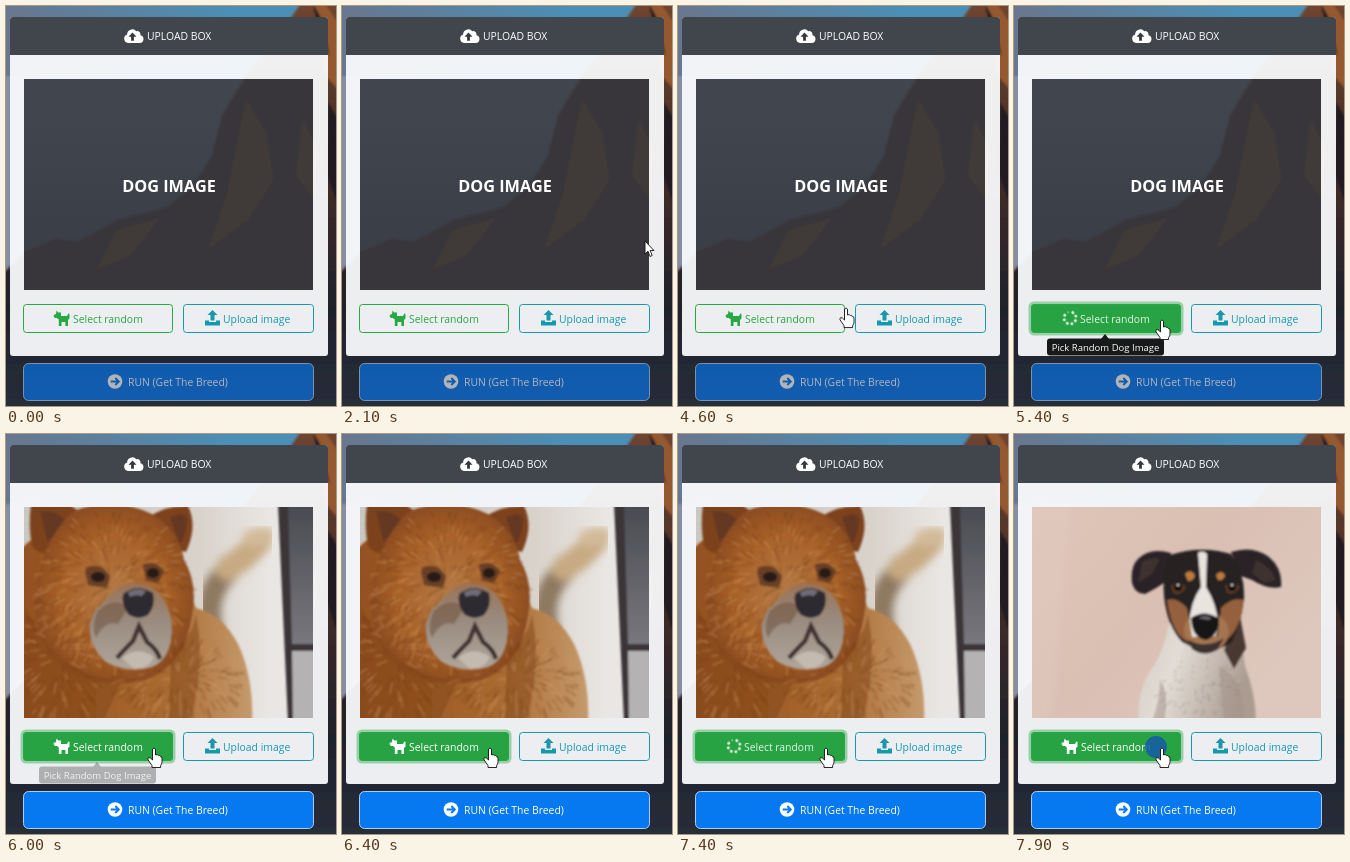
Write an HTML page that moves like this. It is 330x400 px and loops after 8 s.

```html
<!DOCTYPE html>
<html lang="en">
<head>
<meta charset="utf-8">
<title>Upload box</title>
<style>
html, body { margin: 0; width: 100%; height: 100%; overflow: hidden; background: #262b38; }
svg { display: block; width: 330px; height: 400px; }
text { font: 500 10.4px "Open Sans", "Noto Sans", sans-serif; }
.title { font-size: 16.3px; font-weight: 700; }
.tip text { font-size: 9.5px; }

.cursor, .arrow, .hand, .hover, .ring, .icon, .load, .tip, .run, .chow, .terrier, .ripple {
  animation: 8s step-end infinite;
}
.cursor { animation-name: move; animation-timing-function: linear; }
.hover { animation-name: hover; animation-timing-function: linear; }
.tip { animation-name: tip; animation-timing-function: linear; }
.arrow { animation-name: arrow; }
.hand { animation-name: hand; }
.ring { animation-name: ring; }
.load { animation-name: load; }
.icon { animation-name: icon; }
.run { animation-name: run; }
.chow { animation-name: chow; }
.terrier { animation-name: terrier; }
.ripple { animation-name: ripple; }
.spin { animation: spin 2s linear infinite; }

@keyframes move {
  0%, 5% { transform: translate(338px, 222px); }
  12.5%, 30% { transform: translate(303px, 235px); }
  41.25% { transform: translate(240px, 255px); }
  57.5% { transform: translate(168px, 302px); }
  62%, 100% { transform: translate(148px, 314px); }
}
@keyframes hover { 0%, 57.5% { opacity: 0; } 59.4%, 100% { opacity: 1; } }
@keyframes tip {
  0%, 62% { opacity: 0; }
  64%, 74% { opacity: .9; }
  75% { opacity: .27; }
  76%, 100% { opacity: 0; }
}
@keyframes arrow { 0% { opacity: 1; } 57% { opacity: 0; } }
@keyframes hand { 0% { opacity: 0; } 57% { opacity: 1; } }
@keyframes ring { 0% { opacity: 0; } 63.75% { opacity: 1; } }
@keyframes load { 0% { opacity: 0; } 65% { opacity: 1; } 71.25% { opacity: 0; } 87.5% { opacity: 1; } 93.75% { opacity: 0; } }
@keyframes icon { 0% { opacity: 1; } 65% { opacity: 0; } 71.25% { opacity: 1; } 87.5% { opacity: 0; } 93.75% { opacity: 1; } }
@keyframes run { 0% { opacity: .65; } 71.25% { opacity: 1; } }
@keyframes chow { 0% { opacity: 0; } 71.25% { opacity: 1; } 93.75% { opacity: 0; } }
@keyframes terrier { 0% { opacity: 0; } 93.75% { opacity: 1; } }
@keyframes ripple { 0% { opacity: 0; } 63.75% { opacity: .85; } 66.25% { opacity: 0; } 86.25% { opacity: .85; } 88.7% { opacity: 0; } 97.5% { opacity: .85; } }
@keyframes spin { to { transform: rotate(360deg); } }
</style>
</head>
<body>
<svg viewBox="0 0 330 400">
  <defs>
    <linearGradient id="sky"><stop offset="0" stop-color="#68778e"/><stop offset=".7" stop-color="#4b8fb7"/></linearGradient>
    <linearGradient id="rock" x2="0" y2="1">
      <stop offset="0" stop-color="#70452f"/><stop offset=".45" stop-color="#3f2b28"/>
      <stop offset=".75" stop-color="#1f222c"/><stop offset="1" stop-color="#282e3a"/>
    </linearGradient>
    <linearGradient id="slate" x2="0" y2="1"><stop offset="0" stop-color="#42474f"/><stop offset="1" stop-color="#393c44"/></linearGradient>
    <linearGradient id="wall"><stop offset="0" stop-color="#c9c8c3"/><stop offset=".6" stop-color="#d8d2ca"/><stop offset=".85" stop-color="#e9e6e3"/></linearGradient>
    <linearGradient id="door" x2="0" y2="1"><stop offset="0" stop-color="#494b51"/><stop offset="1" stop-color="#939095"/></linearGradient>
    <linearGradient id="coat"><stop offset="0" stop-color="#93501f"/><stop offset=".6" stop-color="#a8692f"/><stop offset="1" stop-color="#c59a6c"/></linearGradient>
    <radialGradient id="face"><stop offset="0" stop-color="#b47a47"/><stop offset=".65" stop-color="#a96229"/><stop offset="1" stop-color="#8d4d20"/></radialGradient>
    <linearGradient id="muzzle" x2="0" y2="1"><stop offset="0" stop-color="#997356"/><stop offset=".45" stop-color="#9a8c81"/><stop offset="1" stop-color="#b1a69b"/></linearGradient>
    <linearGradient id="pink" x2="1" y2=".6"><stop offset="0" stop-color="#dfc4b8"/><stop offset=".5" stop-color="#dabfb3"/><stop offset="1" stop-color="#dec8bd"/></linearGradient>
    <linearGradient id="chest" x2="1" y2=".3"><stop offset="0" stop-color="#d5cdc5"/><stop offset=".4" stop-color="#e2dcd5"/><stop offset="1" stop-color="#ab9c91"/></linearGradient>
    <filter id="soft"><feGaussianBlur stdDeviation=".8"/></filter>
    <filter id="haze"><feGaussianBlur stdDeviation="4"/></filter>
    <clipPath id="frame"><path d="M18 73h289v211H18z"/></clipPath>
    <path id="dog" d="M2.500 0l1.700 2H7v3.500h6l1.300-2.500 1.200.6V8L14 9.500v6h-2.600v-4H7.500v4H4.800V9L3 7.500H1L-.3 6V4.500l2.300-1z"/>
  </defs>

  <path fill="url(#sky)" d="M0 0h330v400H0z"/>
  <g filter="url(#soft)">
    <path fill="#858ea3" d="M-4 70H60V290H-4z"/>
    <path fill="url(#rock)" d="M-4 268L18 246 50 233 72 236 112 214 160 202 186 182 206 150 216 110 236 72 272 30 296 -4H334V404H-4z"/>
    <path fill="#96582e" d="M302 -4L312 8 308 20 316 40 320 70 334 86V20L318 -4z"/>
    <path fill="#7d4d32" d="M240 92l20 34 8 48-26 40-40 30 18-54zM296 110l16 34-4 50-18-24zM110 224l44-12-30 38-34 14z"/>
    <path fill="#231e24" d="M306 -4l8 14 10 40-8-14zM322 96l12 20v90l-14-40zM284 90l10 60-16 60-4-70z"/>
  </g>

  <rect x="4" y="11" width="318" height="339" rx="3" fill="#fafbfd" opacity=".94"/>
  <path d="M4 49V14a3 3 0 0 1 3-3h312a3 3 0 0 1 3 3v35z" fill="#343a40" opacity=".93"/>
  <g fill="#fff">
    <path d="M122 37a4.400 4.400 0 0 1-.9-8.500a5.200 5.200 0 0 1 9.200-3.300a3.300 3.300 0 0 1 4.100 4a3.950 3.950 0 0 1-.9 7.800z"/>
    <path fill="#343a40" d="M126.500 26.500l4 4.200h-2.600v4h-2.800v-4h-2.600z"/>
    <text x="141" y="34">UPLOAD BOX</text>
  </g>

  <g clip-path="url(#frame)">
    <path d="M18 73h289v211H18z" fill="url(#slate)"/>
    <g filter="url(#soft)">
      <path fill="#37363a" d="M14 248L50 233 72 236 112 214 160 202 186 182 206 150 216 110 240 70H311V290H14z"/>
      <path fill="#463c39" d="M240 92l20 34 8 48-26 40-40 30 18-54zM296 110l16 34-4 50-18-24zM110 224l44-12-30 38-34 14z" opacity=".7"/>
    </g>
    <text class="title" x="163" y="186" text-anchor="middle" fill="#fff">DOG IMAGE</text>

    <g class="chow">
      <path fill="url(#wall)" d="M18 73h289v211H18z"/>
      <g filter="url(#soft)">
        <path fill="url(#door)" d="M276 70h34v218h-25z"/>
        <path fill="#b5b2b4" d="M284 216h26v72h-24z"/>
        <path fill="#3a3437" d="M272 70h10l4 140h24v7h-24l1 71h-5z"/>
      </g>
      <g fill="none" stroke-linecap="round" filter="url(#haze)">
        <path stroke="#8d7860" stroke-width="23" d="M205 194Q198 160 220 139"/>
        <path stroke="#c7aa83" stroke-width="25" d="M222 134Q240 124 254 106"/>
        <path stroke="#d3ba97" stroke-width="18" d="M246 104L260 102"/>
      </g>
      <g filter="url(#soft)">
        <path fill="url(#coat)" d="M14 116Q40 88 80 92L176 140 190 174Q216 180 232 210Q248 244 246 290H14z"/>
        <path fill="#7d431f" d="M25 70H62Q78 78 82 96L50 116Q34 124 26 112Q22 92 25 70zM142 84Q158 71 182 72Q192 92 180 118L158 112z"/>
        <path fill="#553022" d="M34 78Q50 74 60 88L42 108zM164 84Q176 76 181 84Q182 98 174 110z" opacity=".6"/>
        <path fill="url(#face)" d="M70 76Q108 62 146 80Q174 98 178 126Q194 152 184 192Q176 232 140 246Q90 256 56 234Q24 204 30 152Q40 98 70 76z"/>
        <path fill="#824719" d="M20 174Q50 244 116 246L96 290H14zM164 220Q186 206 190 180Q200 230 184 290H164z" opacity=".5"/>
      </g>
      <g id="fur" fill="none" stroke-linecap="round" stroke-width="1.300" opacity=".45" filter="url(#soft)"></g>
      <g filter="url(#soft)">
        <path fill="url(#muzzle)" d="M102 164Q116 144 144 152Q166 166 166 198Q164 226 146 233Q122 240 100 228Q82 212 84 190Q88 174 102 164z"/>
        <path fill="#6e5441" d="M92 177Q108 161 122 174L112 190Q99 186 90 204Q84 192 92 177z" opacity=".55"/>
        <path fill="none" stroke="#3f3330" stroke-width="4.500" d="M111 224Q117 217 127 207L133 192 141 208Q151 215 154 225"/>
        <path fill="#c3bab0" d="M116 224Q131 211 148 223Q142 236 128 235z"/>
        <path fill="#58341f" d="M79 135Q93 126 104 142L101 154 82 151zM137 131Q149 125 158 137L152 149 140 146z" opacity=".8"/>
        <ellipse cx="92" cy="143" rx="7" ry="5" fill="#251b18"/>
        <ellipse cx="147" cy="139" rx="6" ry="5" fill="#251b18"/>
        <path fill="#2d2a30" d="M117 160Q131 149 147 159Q150 172 142 181Q132 187 122 180Q115 170 117 160z"/>
        <path fill="#716d78" d="M122 158q10-5 18-1l-4 5q-8-2-12 1z"/>
      </g>
    </g>

    <g class="terrier">
      <path fill="url(#pink)" d="M18 73h289v211H18z"/>
      <path fill="#e5d6c9" d="M10 70h48L38 290H10z" opacity=".25" filter="url(#haze)"/>
      <g filter="url(#soft)">
        <path fill="url(#chest)" d="M155 190Q150 218 137 236Q124 254 124 290H242Q242 260 231 232L225 187z"/>
        <path fill="#4a3932" d="M226 182L232 214 220 235 210 216z"/>
        <path fill="#a5948a" d="M146 246q10 12 4 42h-12q8-22 8-42zM205 232q26 12 25 54h-20z" opacity=".55"/>
        <path fill="#292425" d="M157 119Q137 113 125 124Q116 132 118 149Q121 160 131 160Q143 154 153 147zM217 118Q239 111 255 123Q269 135 267 153Q254 156 238 146L227 142z"/>
        <path fill="#51403b" d="M128 128q10-6 18-3l-8 15-14 9zM242 126q14 5 20 20l-12 3-12-10z" opacity=".5"/>
        <path fill="#252122" d="M156 121Q187 111 217 120Q231 139 230 164Q227 190 218 208Q196 224 168 208Q153 192 150 162Q148 139 156 121z"/>
        <path fill="#95603d" d="M153 166Q163 163 173 174L179 210Q158 205 153 166zM229 166Q218 163 207 174L205 210Q227 201 229 166z"/>
        <path fill="#eae4df" d="M184 119Q189 116 193 120L192 153Q203 170 204 190Q204 208 190 210Q176 208 175 192Q176 168 187 153z"/>
        <path fill="#a4754f" d="M175 182Q166 196 174 208Q182 221 192 218Q207 220 214 203Q217 190 205 181L204 202 178 203z"/>
        <path fill="#3d3030" d="M173 205Q191 216 210 204L204 215Q191 224 178 215z"/>
        <path fill="#181719" d="M177 184Q190 175 204 184Q207 199 193 206Q178 205 177 184z"/>
        <path fill="#69646a" d="M184 184q7-4 14 0l-4 2z"/>
        <path fill="#bd7b3e" d="M171 140q5-6 10 1-1 6-7 6zM202 141q5-6 9 0-1 6-7 5z"/>
        <path fill="#593822" d="M157 152q7-7 15 1-5 10-13 6zM211 152q8-6 15 1-5 9-13 6z"/>
        <circle cx="164" cy="153" r="4" fill="#0d0c0d"/><circle cx="218" cy="153" r="4" fill="#0d0c0d"/>
        <path fill="#d9d7d6" d="M163 150h2v2h-2zM217 150h2v2h-2z"/>
      </g>
      <g id="specks" fill="none" stroke-linecap="round" opacity=".5" filter="url(#soft)"></g>
    </g>
  </g>

  <g fill="#28a745">
    <rect x="17.500" y="298.500" width="149" height="28" rx="3" fill="none" stroke="#28a745"/>
    <use href="#dog" x="48" y="304.500"/>
    <text x="67" y="317">Select random</text>
  </g>
  <g class="hover">
    <rect class="ring" x="16" y="297" width="152" height="31" rx="4" fill="none" stroke="#28a745" stroke-width="3" stroke-opacity=".42"/>
    <rect x="17.500" y="298.500" width="149" height="28" rx="3" fill="#27a343" stroke="#28a745"/>
    <g fill="#fff">
      <g class="icon">
        <use href="#dog" x="48" y="304.500"/>
        <text x="67" y="317">Select random</text>
      </g>
      <g class="load" fill="#e3f3e6">
        <g transform="translate(56 312)"><g class="spin" id="dots"></g></g>
        <text x="66" y="317">Select random</text>
      </g>
    </g>
  </g>

  <g fill="#1798ad">
    <rect x="177.500" y="298.500" width="130" height="28" rx="3" fill="none" stroke="#1798ad"/>
    <path transform="translate(199 304)" d="M7.500 0l5 5h-3v5.500h-4V5h-3zM0 10.500h4V12h7v-1.500h4v5H0z"/>
    <text x="217" y="317">Upload image</text>
  </g>

  <g class="run">
    <rect x="17.500" y="357.500" width="290" height="37" rx="5" fill="#0678f0" stroke="#a9cdf5"/>
    <circle cx="109" cy="375.500" r="7.300" fill="#fff"/>
    <path d="M104.700 375.500h7M109.300 372l3.500 3.500-3.500 3.500" fill="none" stroke="#0678f0" stroke-width="1.900"/>
    <text x="122" y="380" fill="#fff">RUN (Get The Breed)</text>
  </g>

  <g class="tip">
    <path d="M91 328l4 5h-8z"/>
    <rect x="33" y="332.500" width="117" height="17" rx="3"/>
    <text x="91.500" y="344.500" text-anchor="middle" fill="#fff">Pick Random Dog Image</text>
  </g>

  <circle class="ripple" cx="142" cy="313" r="11" fill="#1459a8"/>
  <g class="cursor" stroke="#111" stroke-width=".9" fill="#fff" stroke-linejoin="round">
    <path class="arrow" d="M0 0V13L3 10.200 5 15.500 7.200 14.500 5.200 9.500H9z"/>
    <path class="hand" d="M-1.500 1Q0-1 1.500 1V7Q3.500 5.800 4.300 7.400Q6 6.800 6.400 8.600Q8 8.300 8 10.200V14Q8 16 6.600 17.500V19.500H-2V17.500L-6 11.800Q-6.500 9.700-5 9.500Q-3.500 9.600-1.500 12z"/>
  </g>
</svg>
<script>
const svgNode = (parent, tag, attrs) => {
  const node = document.createElementNS("http://www.w3.org/2000/svg", tag);
  for (const key in attrs) node.setAttribute(key, attrs[key]);
  document.getElementById(parent).append(node);
};

let seed = 17;
const rand = () => (seed = seed * 16807 % 2147483647) / 2147483647;

// Short hairs spread over an ellipse, pointing away from its centre and drooping a little.
function hairs(parent, color, count, cx, cy, rx, ry, length) {
  let d = "";
  for (let i = 0; i < count; i++) {
    const a = rand() * Math.PI * 2, r = Math.sqrt(rand()), l = length * (.5 + rand());
    const x = cx + Math.cos(a) * rx * r, y = cy + Math.sin(a) * ry * r;
    d += `M${x.toFixed(1)} ${y.toFixed(1)}l${(Math.cos(a) * l).toFixed(1)} ${(Math.sin(a) * l + l / 3).toFixed(1)}`;
  }
  svgNode(parent, "path", { d, stroke: color });
}

for (const color of ["#6d3816", "#d09a63", "#8a4b20"]) {
  hairs("fur", color, 150, 106, 154, 74, 74, 8);
  hairs("fur", color, 60, 54, 226, 36, 60, 8);
  hairs("fur", color, 60, 174, 246, 60, 36, 8);
}
hairs("specks", "#80756d", 80, 185, 254, 44, 28, 2);

for (let i = 0; i < 8; i++) {
  const a = i * Math.PI / 4;
  svgNode("dots", "circle", { cx: Math.cos(a) * 6, cy: Math.sin(a) * 6, r: i ? 1.5 : .7 });
}
</script>
</body>
</html>
```
